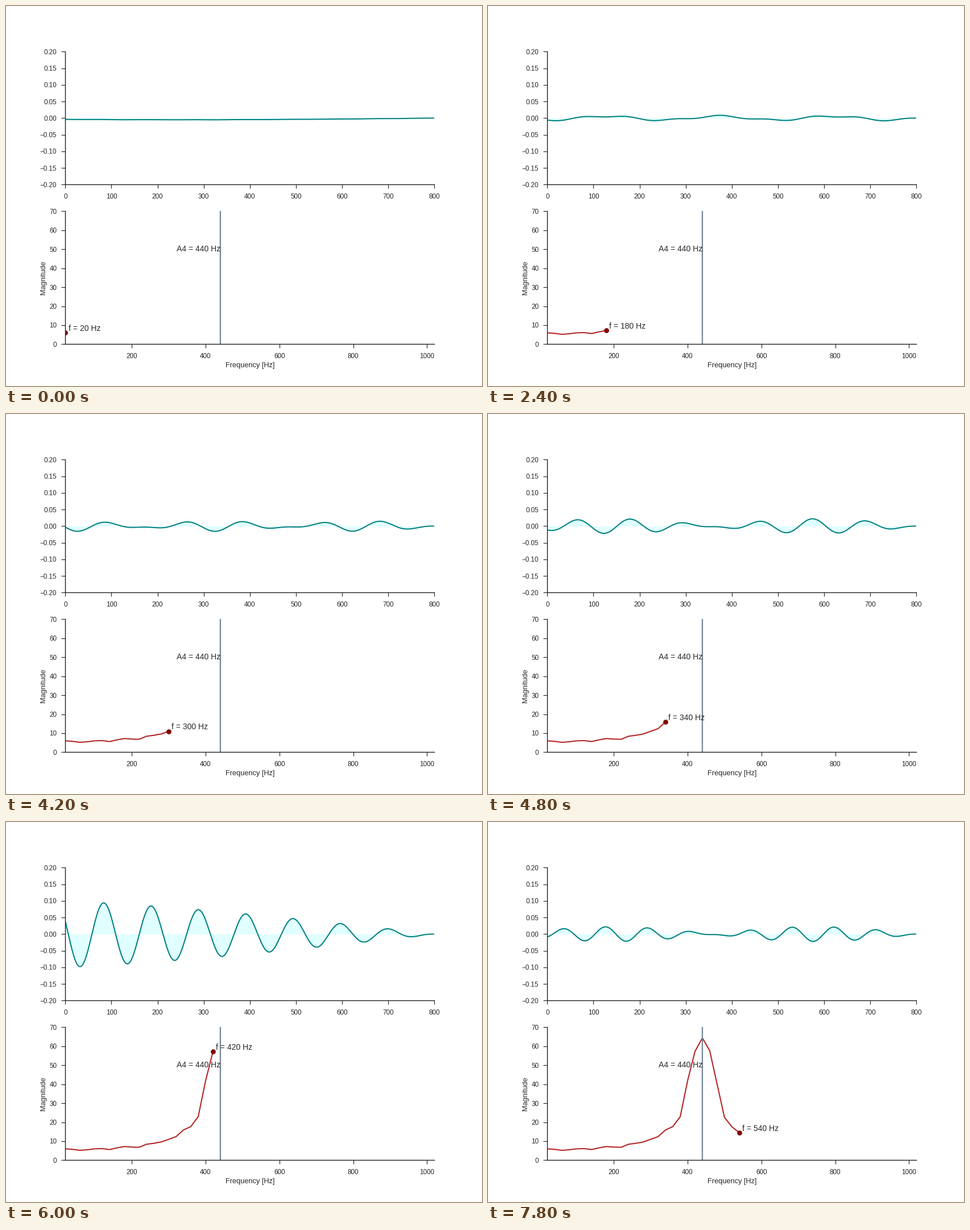
A matplotlib script that plays this animation: 837 by 669 pixels, repeating every 8000 ms.

```python
import numpy as np
import matplotlib.pyplot as plt
from matplotlib.animation import FuncAnimation

DPI = 83.7
INK = "0.15"
RATE = 44100
SAMPLES = 800
RESONANCE = 440.001  # just off 440 so the closed form stays finite there
GAIN = 0.005
TICKS_PER_STEP = 3

plt.rcParams.update({
    "font.family": "Liberation Sans",
    "font.size": 12,
    "text.color": INK,
    "axes.edgecolor": INK,
    "axes.labelcolor": INK,
    "axes.labelsize": 11,
    "axes.linewidth": 1.25,
    "axes.spines.top": False,
    "axes.spines.right": False,
    "lines.linewidth": 1.75,
    "lines.solid_capstyle": "round",
})
for axis in ("xtick", "ytick"):
    plt.rcParams.update({
        f"{axis}.color": INK,
        f"{axis}.labelsize": 10,
        f"{axis}.major.size": 6,
        f"{axis}.major.width": 1,
        f"{axis}.major.pad": 7,
    })

x = np.arange(SAMPLES)


def response(freq):
    """Undamped oscillator driven from rest, newest sample first."""
    t = 2 * np.pi * (SAMPLES + 1 - x) / RATE
    ratio = freq / RESONANCE
    wave = np.sin(freq * t) - ratio * np.sin(RESONANCE * t)
    return -GAIN * wave / (1 - ratio ** 2)


freqs = np.arange(20, 541, 20)
waves = [response(f) for f in freqs]
# Measured response, one point per driving frequency
magnitudes = [6.0, 5.7, 5.2, 5.5, 6.0, 6.1, 5.6, 6.5, 7.2,
              6.9, 6.8, 8.4, 8.9, 9.6, 11.0, 12.4, 15.9, 17.7,
              22.9, 41.8, 57.2, 64.4, 57.6, 40.0, 22.5, 17.6, 14.5]

fig, (top, bottom) = plt.subplots(
    2, 1, figsize=(837.001 / DPI, 669.001 / DPI), dpi=DPI, facecolor="white")
fig.subplots_adjust(left=0.1247, right=0.9, bottom=0.11, top=0.88, hspace=0.2)

top.set(xlim=(0, 800), ylim=(-0.2, 0.2),
        xticks=np.arange(0, 801, 100), yticks=np.arange(-4, 5) / 20)
bottom.set(xlim=(20, 1020), ylim=(0, 70),
           xticks=np.arange(200, 1001, 200), yticks=np.arange(0, 71, 10),
           xlabel="Frequency [Hz]", ylabel="Magnitude")

signal, = top.plot([], [], color="teal")
curve, = bottom.plot([], [], color="firebrick")
dot, = bottom.plot([], [], "o", color="maroon", ms=7.5, mew=0)
bottom.axvline(440, color="lightslategray", lw=2, snap=False)
bottom.text(440, 50, "A4 = 440 Hz", ha="right", va="center")
label = bottom.text(0, 0, "")
fills = []


def update(tick):
    step = tick // TICKS_PER_STEP
    freq, mag, wave = freqs[step], magnitudes[step], waves[step]
    while fills:
        fills.pop().remove()
    fills.append(top.fill_between(x, wave, color="lightcyan", lw=0.3))
    signal.set_data(x, wave)
    curve.set_data(freqs[:step + 1], magnitudes[:step + 1])
    dot.set_data([freq], [mag])
    label.set_position((freq + 8, mag + 1))
    label.set_text(f"f = {freq} Hz")
    return signal, curve, dot, label


anim = FuncAnimation(fig, update, frames=80, interval=100,
                     init_func=lambda: update(0), repeat=True, repeat_delay=0)
plt.show()
```
